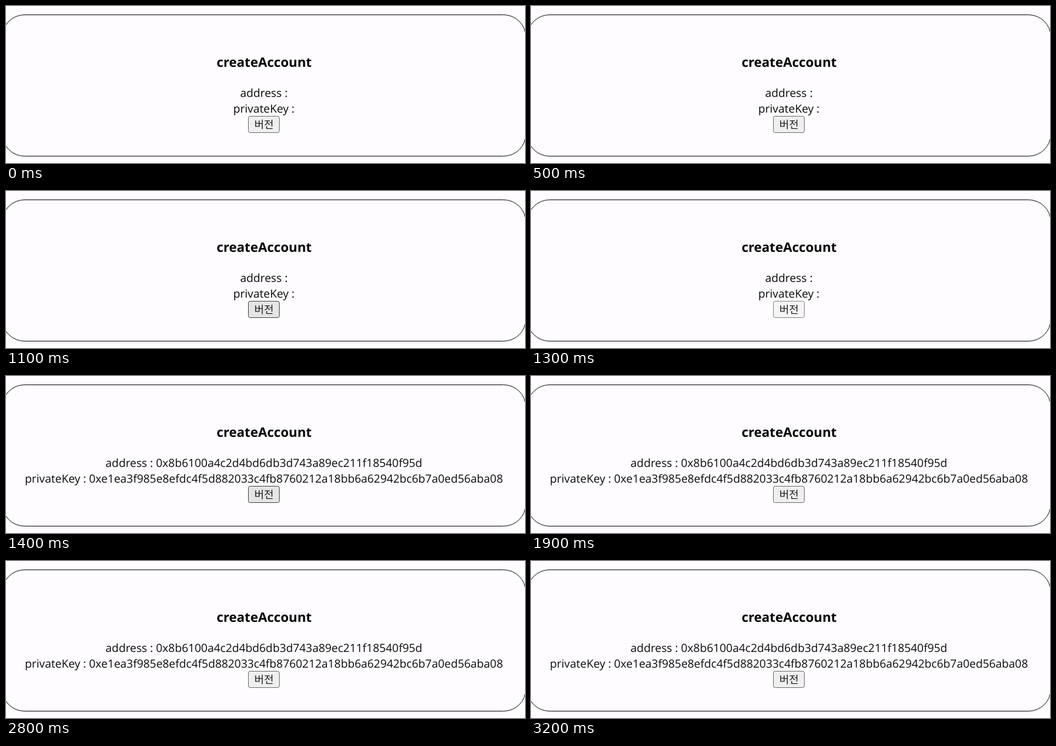
Recreate the animation shown at these times as an HTML page. Size 789 by 240 pixels, loop 3300 ms.

```html
<!DOCTYPE html>
<html lang="ko">
<head>
<meta charset="utf-8">
<title>createAccount</title>
<style>
  html, body { margin: 0; width: 100%; height: 100%; overflow: hidden; background: #fefcff; }
  svg { display: block; width: 789px; height: 240px; }
  text { font-family: "Open Sans", "Noto Sans", sans-serif; font-size: 17.16px; text-anchor: middle; fill: #0a0a0a; text-rendering: geometricPrecision; }
  .title { font-size: 19.93px; font-weight: 700; fill: #000; }
  .label { font-family: "Noto Sans CJK KR", "Noto Sans CJK", sans-serif; font-size: 16px; font-weight: 300; fill: #1c1c1c; }
</style>
</head>
<body>
<svg viewBox="0 0 789 240">
  <rect x="-5.6" y="13.5" width="795.8" height="216" rx="33.75" fill="none" stroke="#1a1a1a"/>
  <text class="title" x="392.4" y="93">createAccount</text>
  <text id="address" x="392.1" y="139"></text>
  <text id="key" x="392.1" y="163"></text>
  <rect id="button" x="368.5" y="168.5" width="47" height="25" rx="2.6"/>
  <text class="label" x="392.2" y="187">버전</text>
</svg>
<script>
const LOOP = 3300, PRESS = 1300, RELEASE = 1400;
const account = {
  address: "0x8b6100a4c2d4bd6db3d743a89ec211f18540f95d",
  key: "0xe1ea3f985e8efdc4f5d882033c4fb8760212a18bb6a62942bc6b7a0ed56aba08"
};
const styles = {
  idle: ["#efefef", "#767676"],
  hover: ["#e5e5e5", "#4f4f4f"],
  active: ["#f5f5f5", "#8d8d8d"]
};
const el = id => document.getElementById(id);
const [address, key, button] = ["address", "key", "button"].map(el);

function buttonState(t) {
  if (t >= PRESS && t < RELEASE) return "active";
  return t >= 1000 && t < 1900 ? "hover" : "idle";
}

function render(t) {
  const done = t >= RELEASE;
  address.textContent = "address :" + (done ? " " + account.address : "");
  key.textContent = "privateKey :" + (done ? " " + account.key : "");
  const [fill, stroke] = styles[buttonState(t)];
  button.setAttribute("fill", fill);
  button.setAttribute("stroke", stroke);
}

const start = performance.now();
function tick() {
  render((performance.now() - start) % LOOP);
  requestAnimationFrame(tick);
}
tick();
</script>
</body>
</html>
```
